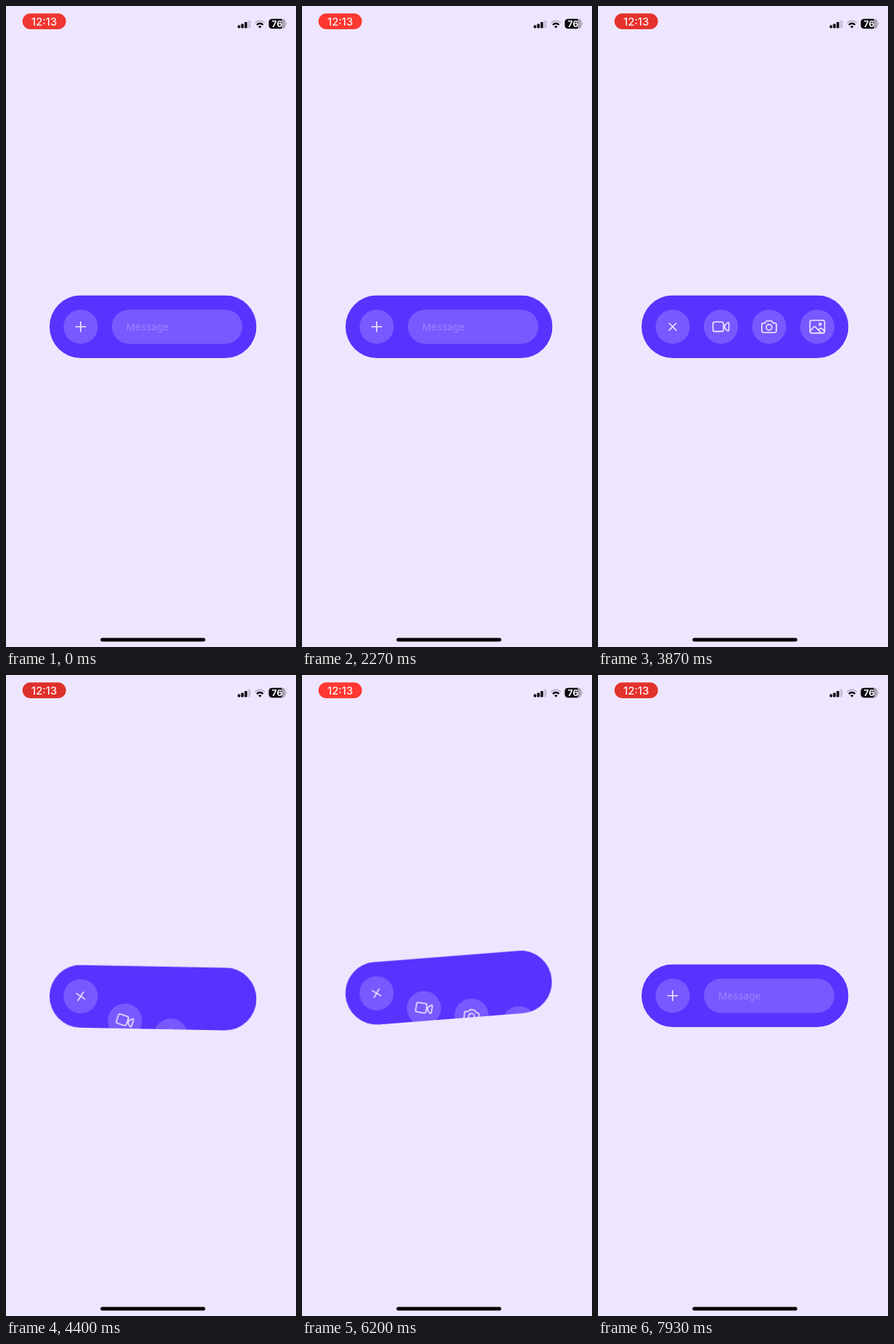
Animation, 400 px wide and 883 px high, one loop 8 s. Source, as an HTML page:

```html
<!DOCTYPE html>
<html lang="en">
<head>
<meta charset="utf-8">
<title>Message bar</title>
<style>
  @property --open { syntax: "<number>"; inherits: true; initial-value: 0; }

  html, body { margin: 0; width: 100%; height: 100%; overflow: hidden; background: #eee6ff; }
  svg { display: block; width: 100%; height: 100%; }
  text { font-family: Inter, Roboto, sans-serif; }

  .bar {
    transform-origin: 60px 442px;
    animation: toggle 8s infinite, tilt 8s infinite ease-in-out;
  }
  .actions, .input { transform-origin: 60px 442px; }
  .actions { transform: rotate(calc((1 - var(--open)) * 60deg)); }
  .input { transform: rotate(calc(var(--open) * -60deg)); }
  .plus { transform-origin: 103px 441.8px; transform: rotate(calc(var(--open) * 45deg)); }
  .soft { fill: #7a58ff; }
  .line { fill: none; stroke: #f1ebff; stroke-width: 1.6; stroke-linecap: round; stroke-linejoin: round; }
  .recording { animation: pulse 8s infinite ease-in-out; }

  @keyframes toggle {
    0%, 28.44% { --open: 0; animation-timing-function: ease; }
    32.94%, 54.13% { --open: 1; animation-timing-function: ease; }
    58.63%, 75.38% { --open: 0; animation-timing-function: ease; }
    79.88%, 91% { --open: 1; animation-timing-function: ease; }
    95.5%, 100% { --open: 0; }
  }
  @keyframes tilt {
    0%, 28.44% { transform: rotate(0deg); }
    31.19% { transform: rotate(-5deg); }
    36.06%, 54.13% { transform: rotate(0deg); }
    56.88% { transform: rotate(5deg); }
    61.5%, 75.38% { transform: rotate(0deg); }
    78.13% { transform: rotate(-5deg); }
    83%, 91% { transform: rotate(0deg); }
    93.75% { transform: rotate(5deg); }
    98.63%, 100% { transform: rotate(0deg); }
  }
  @keyframes pulse {
    0% { fill: #ef3630; }
    11.3% { fill: #de302b; }
    33.4% { fill: #ff3831; }
    55.4% { fill: #de302b; }
    77.5% { fill: #ff3831; }
    99.6%, 100% { fill: #e2322c; }
  }
</style>
</head>
<body>
<svg viewBox="0 0 400 883" preserveAspectRatio="none">
  <defs>
    <clipPath id="pill"><rect x="60" y="398.5" width="285.5" height="86.5" rx="43.25"/></clipPath>
    <clipPath id="battery"><rect x="362.5" y="17.8" width="23" height="13.4" rx="4.2"/></clipPath>
  </defs>
  <rect width="400" height="883" fill="#eee6ff"/>

  <!-- status bar -->
  <rect class="recording" x="22.7" y="10.3" width="60" height="21.6" rx="10.8"/>
  <text x="52.7" y="26.6" font-size="14.8" font-weight="500" fill="#fff2f3" text-anchor="middle">12:13</text>
  <g fill="#0b0811">
    <rect x="319.6" y="26.4" width="3.6" height="4" rx="1"/>
    <rect x="324.3" y="24.4" width="3.6" height="6" rx="1"/>
    <rect x="329" y="22" width="3.6" height="8.4" rx="1"/>
    <rect x="333.8" y="19.4" width="3.6" height="11" rx="1" fill="#c9c2d8"/>
  </g>
  <g fill="none" stroke-width="2.2">
    <path d="M343.4 23.4Q350.2 17.2 357 23.4" stroke="#c3bbd2"/>
    <path d="M345.8 26Q350.2 22 354.6 26" stroke="#0b0811"/>
  </g>
  <path d="M347.9 28.2Q350.2 26.4 352.5 28.2L350.2 30.7Z" fill="#0b0811"/>
  <g clip-path="url(#battery)">
    <rect x="362" y="17" width="24" height="15" fill="#aaa4b6"/>
    <rect x="362" y="17" width="18.4" height="15" fill="#0b0811"/>
  </g>
  <path d="M386.4 22.3q1.9 2.2 0 4.4z" fill="#aaa4b6"/>
  <text x="373.9" y="28.9" font-size="12" font-weight="700" fill="#fff" text-anchor="middle">76</text>

  <!-- message bar -->
  <g class="bar">
    <g clip-path="url(#pill)">
      <rect x="60" y="398.5" width="285.5" height="86.5" fill="#5932ff"/>
      <circle class="soft" cx="103" cy="441.8" r="23.6"/>
      <path class="plus line" d="M96.2 441.8h13.6M103 435v13.6"/>

      <g class="input">
        <rect class="soft" x="146" y="418.2" width="180" height="47.2" rx="23.6"/>
        <text x="166" y="446.8" font-size="13.6" fill="#9c83ff">Message</text>
      </g>

      <g class="actions">
        <g class="soft">
          <circle cx="169.5" cy="441.8" r="23.6"/>
          <circle cx="236" cy="441.8" r="23.6"/>
          <circle cx="302.5" cy="441.8" r="23.6"/>
        </g>
        <g class="line">
          <rect x="158.6" y="435.2" width="14.4" height="13.2" rx="2.4"/>
          <path d="M174.8 440l3.5-3.5q2.2-1.4 2.2 1v8.6q0 2.4-2.2 1l-3.5-3.5z"/>

          <path d="M228.2 436.8h2.3l1.6-2.4q.5-.7 1.3-.7h5.2q.8 0 1.3.7l1.6 2.4h2.3q2.2 0 2.2 2.2v8.6q0 2.2-2.2 2.2h-15.6q-2.2 0-2.2-2.2V439q0-2.2 2.2-2.2z"/>
          <circle cx="236" cy="442.6" r="4"/>

          <rect x="292.4" y="433" width="20.2" height="17.6" rx="2.6"/>
          <path d="M292.6 447.6l5-5.4q1.2-1.2 2.4 0l7.8 8.2M304.2 446.4l2.2-2q1.2-1 2.4 0l3.6 3.4"/>
          <circle cx="306.4" cy="438.4" r="1.5"/>
        </g>
      </g>
    </g>
  </g>

  <!-- home indicator -->
  <rect x="130.3" y="870.4" width="144.6" height="5" rx="2.5" fill="#050308"/>
</svg>
</body>
</html>
```
